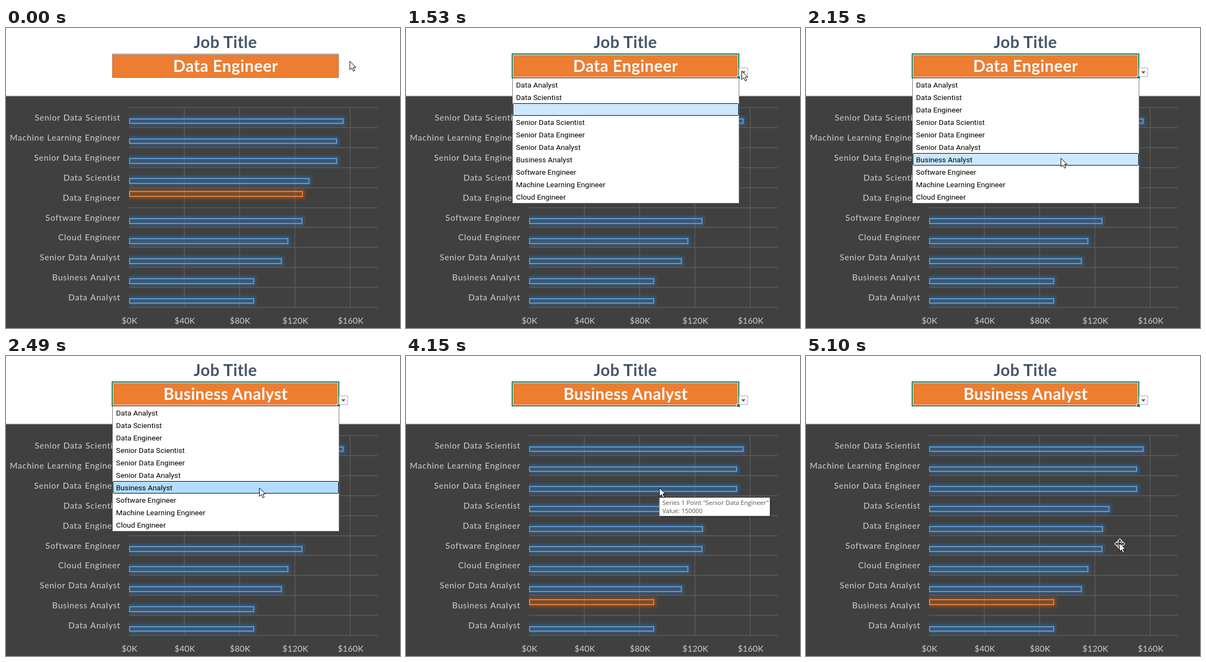
These frames come from a looping animation (727x554 px, 5160 ms). An HTML page:

```html
<!DOCTYPE html>
<html lang="en">
<head>
<meta charset="utf-8">
<title>Job Title chart</title>
<style>
  html, body { margin: 0; width: 100%; height: 100%; overflow: hidden; background: #fff; }
  svg { display: block; width: 727px; height: 554px; }
  .head { font: bold 30px Lato, sans-serif; letter-spacing: .4px; text-anchor: middle; }
  .label { font: 15.4px Lato, sans-serif; letter-spacing: .8px; word-spacing: .7px; fill: #d0d0d0; text-anchor: end; }
  .axis { letter-spacing: .3px; text-anchor: middle; }
  .item { font: 13.7px Roboto, sans-serif; fill: #000; }
  .tip { font: 11.4px "Open Sans", sans-serif; fill: #505050; }
  .grid { stroke: #565656; stroke-width: 2; }
</style>
</head>
<body>
<svg id="stage" viewBox="0 0 727 554" xmlns="http://www.w3.org/2000/svg">
  <defs>
    <filter id="blur" filterUnits="userSpaceOnUse" x="200" y="130" width="500" height="410">
      <feGaussianBlur stdDeviation="2.6"/>
    </filter>
    <clipPath id="plot"><rect x="227" y="126" width="480" height="428"/></clipPath>
    <path id="pointer" d="M.5 .5V16.2L4.2 12.7L6.9 18.8L9.5 17.7L6.9 11.7H11.7Z"
      fill="#fff" stroke="#000" stroke-linejoin="round"/>
  </defs>

  <rect width="727" height="554" fill="#fff"/>
  <rect y="124" width="727" height="2" fill="#d9d9d9"/>
  <rect y="126" width="727" height="428" fill="#3f403f"/>
  <text class="head" x="404.7" y="37" fill="#44546a">Job Title</text>

  <rect x="196" y="48" width="418" height="44" fill="#ed7d31"/>
  <g id="plain" fill="none">
    <path d="M196.500 48V91.500H613.500V48" stroke="#c0703a"/>
    <path d="M196 48H614" stroke="#9dbbe0" stroke-width="2"/>
  </g>
  <g id="picked">
    <rect x="197.500" y="49.500" width="415" height="41" fill="none" stroke="#fff"/>
    <rect x="196" y="48" width="418" height="44" fill="none" stroke="#217346" stroke-width="2"/>
    <rect x="610.500" y="88.500" width="6" height="6" fill="#217346" stroke="#fff"/>
    <rect x="614.500" y="73.500" width="16" height="16" fill="#fdfdfd" stroke="#ababab"/>
    <path d="M618.500 80H626.500L622.500 84.500Z" fill="#606060"/>
  </g>
  <text class="head" id="value" x="405.2" y="81" fill="#fff"></text>

  <g id="grid"></g>
  <g id="bars" clip-path="url(#plot)"></g>
  <g id="labels"></g>

  <g id="list">
    <rect x="196.500" y="92.500" width="418" height="231" fill="#fff" stroke="#7a7a7a"/>
    <rect id="hover" x="197.500" width="416" height="22" rx="1" stroke="#000"/>
    <g id="items"></g>
  </g>

  <g id="tip">
    <rect x="469" y="264" width="205" height="34" rx="2" fill="#000" opacity=".25"/>
    <rect x="467.500" y="261.500" width="204" height="34" rx="1.500" fill="#fff" stroke="#8a8a8a"/>
    <text class="tip" x="473" y="275">Series 1 Point "Senior Data Engineer"</text>
    <text class="tip" x="473" y="290">Value: 150000</text>
  </g>

  <g id="cursor">
    <use id="arrow" href="#pointer"/>
    <path id="cross" d="M-2.500-6.500H2.500V-2.500H6.500V2.500H2.500V6.500H-2.500V2.500H-6.500V-2.500H-2.500Z"
      fill="#fff" stroke="#000" stroke-width="1.600"/>
    <g id="move">
      <path d="M0-9.500L4-5H1.500V-1.500H5V-4L9.500 0L5 4V1.500H1.500V5H4L0 9.500L-4 5H-1.500V1.500H-5V4L-9.500 0L-5-4V-1.500H-1.500V-5H-4Z"
        fill="#111" stroke="#fff" stroke-width="1.200"/>
      <use href="#pointer" x="-1" y="-2"/>
    </g>
  </g>
</svg>
<script>
const LOOP = 5160, PITCH = 36.9, ROW = 23;
const $ = id => document.getElementById(id);

// Job title and right end of its bar
const jobs = [
  ["Senior Data Scientist", 622], ["Machine Learning Engineer", 610],
  ["Senior Data Engineer", 610], ["Data Scientist", 559],
  ["Data Engineer", 547], ["Software Engineer", 546],
  ["Cloud Engineer", 520], ["Senior Data Analyst", 508],
  ["Business Analyst", 457], ["Data Analyst", 457]
];
const OLD = 4, NEW = 8;
const options = [9, 3, 4, 0, 2, 7, 8, 5, 1, 6].map(i => jobs[i][0]);

// Step tables: each row holds from its time until the next
const path = [
  [0, 634, 61, "arrow"], [70, 633, 66, "arrow"], [140, 624, 76, "cross"],
  [210, 610, 84, "cross"], [280, 596, 86, "cross"], [350, 584, 83, "cross"],
  [430, 577, 77, "cross"], [520, 582, 73, "cross"],
  [680, 584, 71, "cross"], [750, 590, 71, "cross"], [810, 596, 72, "cross"],
  [870, 600, 74, "cross"], [1200, 609, 76, "cross"], [1270, 617, 78, "arrow"],
  [1330, 621, 80, "arrow"], [1530, 619, 79, "arrow"],
  [1600, 612, 84, "arrow"], [1670, 592, 99, "arrow"], [1740, 566, 118, "arrow"],
  [1810, 540, 135, "arrow"], [1940, 512, 153, "arrow"], [2010, 492, 194, "arrow"],
  [2080, 477, 230, "arrow"], [2150, 470, 240, "arrow"], [2220, 467, 243, "arrow"],
  [4350, 461, 230, "arrow"], [4420, 452, 209, "arrow"], [4490, 428, 156, "arrow"],
  [4560, 411, 123, "move"], [4630, 430, 152, "move"], [4690, 474, 222, "move"],
  [4760, 528, 292, "move"], [4830, 566, 334, "move"], [4900, 577, 345, "arrow"],
  [5100, 579, 347, "move"]
];
const tipFade = [
  [0, 0], [3940, .25], [4010, .5], [4080, .8], [4150, 1],
  [4690, .75], [4760, .5], [4830, .25], [4900, 0]
];
const swap = [[0, 0], [3490, .5], [3620, 1]];

const at = (table, t) => table.findLast(step => step[0] <= t);
const show = (id, on) => $(id).setAttribute("display", on ? "inline" : "none");

function add(parent, tag, attrs, text) {
  const el = document.createElementNS("http://www.w3.org/2000/svg", tag);
  for (const k in attrs) el.setAttribute(k, attrs[k]);
  if (text) el.textContent = text;
  return parent.appendChild(el);
}

// Returns a function that sets the bar to a share of its full length
function bar(row, orange) {
  const mid = 172 + row * PITCH - (orange ? 13 : 0);
  const top = Math.round(mid - 4.4), bottom = Math.round(mid + 4.4);
  const full = jobs[row][1] - 228;
  const color = orange ? "#ed7d31" : "#5b9bd5";
  const g = add($("bars"), "g", {});
  const glow = add(g, "rect", {
    x: 220, y: top - 5, height: bottom - top + 10, rx: 3, opacity: .36,
    fill: orange ? "#e0620c" : "#3580cc", filter: "url(#blur)"
  });
  const box = add(g, "rect", {
    x: 228, y: top, height: bottom - top, fill: "none",
    stroke: color, "stroke-width": 2
  });
  return share => {
    g.setAttribute("display", share ? "inline" : "none");
    box.setAttribute("width", full * share);
    glow.setAttribute("width", full * share + 13);
  };
}

for (let i = 0; i <= 10; i++) {
  const y = Math.round(147 + i * PITCH);
  add($("grid"), "line", { class: "grid", x1: 227, x2: 686, y1: y, y2: y });
}
for (let i = 0; i < 5; i++) {
  const x = 227 + i * 102;
  if (i) add($("grid"), "line", { class: "grid", x1: x, x2: x, y1: 147, y2: 516 });
  add($("labels"), "text", { class: "label axis", x: x + 1, y: 546 }, `$${i * 40}K`);
}
const blue = jobs.map(([name], i) => {
  add($("labels"), "text", { class: "label", x: 211.3, y: Math.round(171 + i * PITCH) }, name);
  const set = bar(i, false);
  set(1);
  return set;
});
const oldMark = bar(OLD, true), newMark = bar(NEW, true);
const items = options.map((name, i) =>
  add($("items"), "text", { class: "item", x: 203, y: 110 + i * ROW }, name));

function draw(t) {
  const [, x, y, kind] = at(path, t);
  $("cursor").setAttribute("transform", `translate(${x} ${y})`);
  for (const id of ["arrow", "cross", "move"]) show(id, id === kind);

  show("plain", t < 1010);
  show("picked", t >= 1010);
  $("value").textContent = jobs[t < 2490 ? OLD : NEW][0];

  const open = t >= 1460 && t < 3360;
  show("list", open);
  if (open) {
    const row = y < 93 ? 2 : Math.floor((y - 93) / ROW);
    $("hover").setAttribute("y", 93.5 + row * ROW);
    $("hover").setAttribute("fill", t < 2420 ? "#cce8ff" : "#b3ddff");
    items[2].setAttribute("display", row === 2 ? "none" : "inline");
  }

  const k = at(swap, t)[1];
  blue[OLD](k);
  blue[NEW](1 - k);
  oldMark(1 - k);
  newMark(k);
  $("tip").setAttribute("opacity", at(tipFade, t)[1]);
}

const start = performance.now();
function tick() {
  draw((performance.now() - start) % LOOP);
  requestAnimationFrame(tick);
}
draw(0);
requestAnimationFrame(tick);
</script>
</body>
</html>
```
